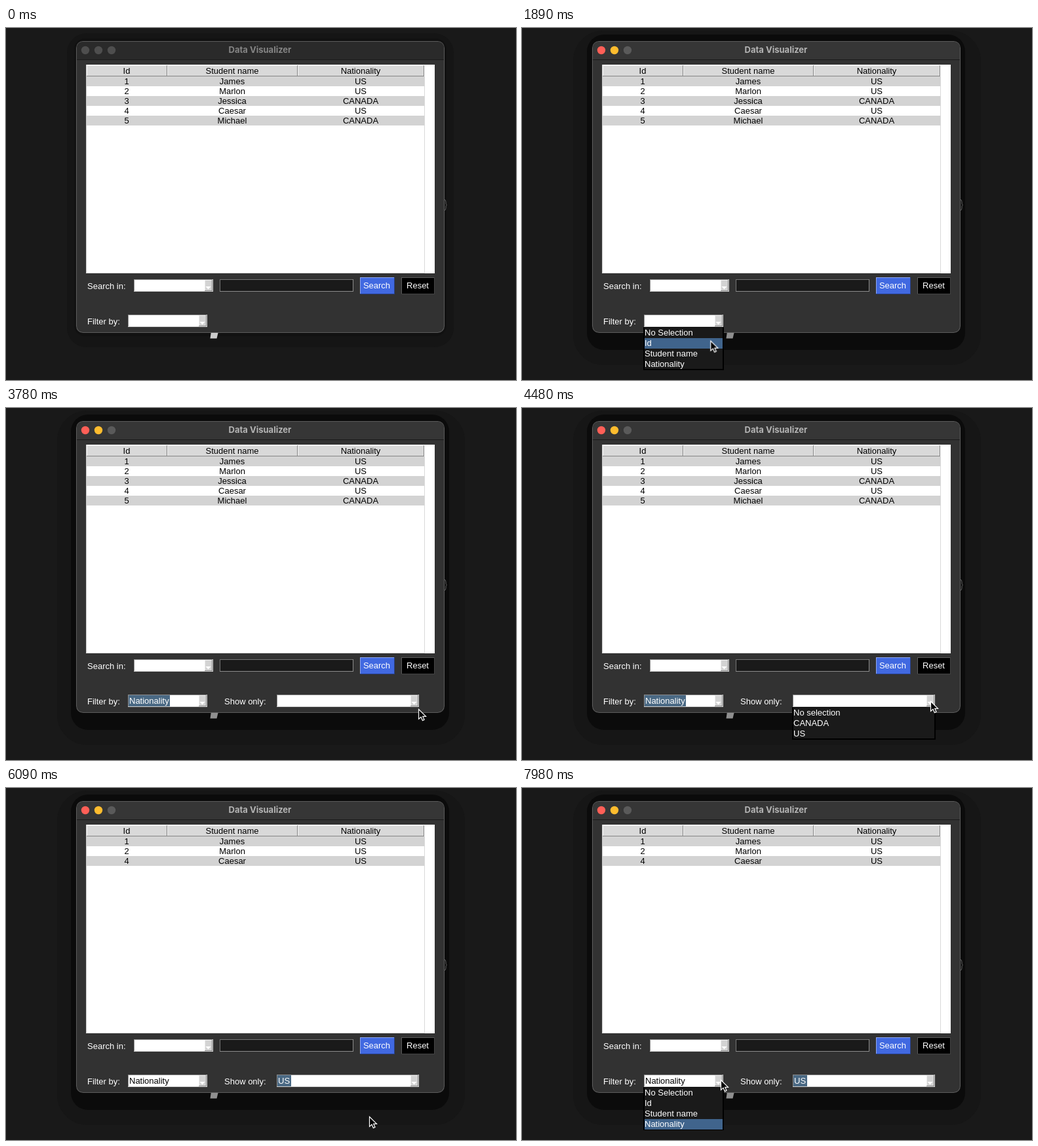
These frames come from a looping animation (778x538 px, 8000 ms). An HTML page:

```html
<!DOCTYPE html>
<html lang="en">
<head>
<meta charset="utf-8">
<title>Table filter demo</title>
<style>
html, body { margin: 0; width: 100%; height: 100%; overflow: hidden; background: #191919; }
svg { display: block; width: 778px; height: 538px; font: 13px "Liberation Sans", Arial, sans-serif; }
rect { shape-rendering: crispEdges; }
.round { shape-rendering: auto; }
.mid { text-anchor: middle; }
.title { font: 700 13px Inter, sans-serif; text-anchor: middle; }

.step { animation: 8s step-end infinite; }
.idle { animation-name: idle; }
.active { animation-name: active; }
.all-rows { animation-name: all-rows; }
.us-rows { animation-name: us-rows; }
.field-list { animation-name: field-list; }
.value-list { animation-name: value-list; }
.field-hover { animation-name: field-hover; }
.value-hover { animation-name: value-hover; }
.field-marked { animation-name: field-marked; }
.field-plain { animation-name: field-plain; }
.show-only { animation-name: show-only; }
.value-marked { animation-name: value-marked; }
.ring { animation-name: ring; }
.pointer { animation: pointer 8s linear infinite; }

@keyframes idle { 0% { opacity: 1 } 17.4%, 100% { opacity: 0 } }
@keyframes active { 0% { opacity: 0 } 17.4%, 100% { opacity: 1 } }
@keyframes all-rows { 0% { opacity: 1 } 69%, 100% { opacity: 0 } }
@keyframes us-rows { 0% { opacity: 0 } 69%, 100% { opacity: 1 } }
@keyframes field-list { 0%, 37.5% { opacity: 0 } 19.15%, 99.65%, 100% { opacity: 1 } }
@keyframes value-list { 0%, 68.15%, 100% { opacity: 0 } 55.9% { opacity: 1 } }
@keyframes field-marked { 0%, 68.15%, 100% { opacity: 0 } 37.5% { opacity: 1 } }
@keyframes field-plain { 0% { opacity: 0 } 68.15%, 100% { opacity: 1 } }
@keyframes show-only { 0% { opacity: 0 } 38.4%, 100% { opacity: 1 } }
@keyframes value-marked { 0% { opacity: 0 } 68.15%, 100% { opacity: 1 } }
@keyframes field-hover {
  0% { opacity: 0; transform: none }
  21.7% { opacity: 1; transform: none }
  23.4% { opacity: 1; transform: translateY(16px) }
  24.5% { opacity: 1; transform: translateY(32px) }
  26%, 100% { opacity: 1; transform: translateY(48px) }
}
@keyframes value-hover {
  0% { opacity: 0; transform: none }
  59.7% { opacity: 1; transform: none }
  61.2% { opacity: 1; transform: translateY(16px) }
  62.5%, 100% { opacity: 1; transform: translateY(32px) }
}
@keyframes ring {
  0%, 19.15%, 37.5%, 55.9%, 68.15%, 99.65%, 100% { opacity: 0 }
  17.4%, 35.8%, 54.15%, 66.4%, 97.9% { opacity: 1 }
}
@keyframes pointer {
  0%, 3.5% { transform: translate(368px, 545px); animation-timing-function: ease-in-out }
  14.875%, 20.1% { transform: translate(300px, 451px); animation-timing-function: ease-in-out }
  28%, 42% { transform: translate(269px, 516px); animation-timing-function: ease-in-out }
  47.25% { transform: translate(629px, 460px) }
  49% { transform: translate(632px, 455px); animation-timing-function: ease-in-out }
  52.5%, 57.75% { transform: translate(623px, 448px); animation-timing-function: ease-in-out }
  63% { transform: translate(557px, 497px); animation-timing-function: ease-out }
  64.75%, 77.9% { transform: translate(554px, 502px); animation-timing-function: cubic-bezier(.4, .15, .8, .85) }
  89.25% { transform: translate(330px, 452px); animation-timing-function: ease-out }
  96.25%, 100% { transform: translate(303px, 446px) }
}
</style>
</head>
<body>
<svg id="stage" viewBox="0 0 778 538"></svg>
<script>
const rect = (x, y, w, h, fill, extra = '') =>
  `<rect x="${x}" y="${y}" width="${w}" height="${h}" fill="${fill}" ${extra}/>`;
const text = (x, y, str, fill = '#000', cls = '') =>
  `<text x="${x}" y="${y}" fill="${fill}" class="${cls}">${str}</text>`;
const step = (cls, body) => `<g class="step ${cls}">${body}</g>`;
const round = (x, y, w, h, r, fill) => rect(x, y, w, h, fill, `rx="${r}" class="round"`);
const light = (x, fill) => `<circle cx="${x}" cy="34" r="6.2" fill="${fill}"/>`;

// Box with light top/left and dark bottom/right edges
const bevel = (x, y, w, h, fill, hi, lo) =>
  rect(x, y, w, h, lo) + rect(x, y, w - 1, h - 1, hi) + rect(x + 1, y + 1, w - 2, h - 2, fill);

const combo = (x, y, w) =>
  bevel(x, y, w, 19, '#fff', '#8c8c8c', '#d0d0d0') +
  bevel(x + w - 13, y + 1, 12, 17, '#d3d3d3', '#eee', '#8c8c8c') +
  `<path d="M${x + w - 11.5} ${y + 11}h8l-4 4.5z" fill="#fff"/>`;

const columns = [[123, 123, 184, 'Id'], [246, 199, 345, 'Student name'], [445, 193, 541, 'Nationality']];
const students = [
  ['1', 'James', 'US'], ['2', 'Marlon', 'US'], ['3', 'Jessica', 'CANADA'],
  ['4', 'Caesar', 'US'], ['5', 'Michael', 'CANADA']
];

const header = columns.map(([x, w, mid, name]) =>
  bevel(x, 57, w, 17, '#d9d9d9', '#f4f4f4', '#858585') + text(mid, 70, name, '#000', 'mid')).join('');

const rows = list => list.map((cells, i) =>
  rect(123, 74 + 15 * i, 515, 15, i % 2 ? '#fff' : '#d3d3d3') +
  cells.map((c, k) => text(columns[k][2], 86 + 15 * i, c, '#000', 'mid')).join('')).join('');

const dropdown = (x, w, items, hover) =>
  rect(x - 1, 457, w + 2, items.length * 16 + 2, '#000') +
  rect(x + 1, 458, w - 2, items.length * 16 - 1, '#1a1a1a') +
  step(hover, rect(x + 1, 458, w - 2, 16, '#40648c')) +
  items.map((s, i) => text(x + 1, 470 + 16 * i, s, '#fff')).join('');

const marked = (x, w, str) => rect(x + 1, 439, w, 17, '#4a6984') + text(x + 2, 452, str, '#fff');

const backdrop =
  rect(0, 0, 778, 538, '#191919') +
  step('idle', round(93, 8, 590, 480, 30, '#151515') + round(104, 16, 568, 455, 16, '#111')) +
  step('active', round(78, 4, 622, 511, 46, '#161616') + round(99, 10, 577, 482, 26, '#0b0b0b')) +
  '<path d="M668 262q3 0 3 4v2q0 2 1.5 2.5q-1.5 .5-1.5 2.5v2q0 4-3 4" fill="none" stroke="#666"/>' +
  '<g fill="#ccc">' + step('idle', '<path d="M313 464h11l-2.5 10.500h-10z"/>') + '</g>' +
  '<g fill="#8f8f8f">' + step('active', '<path d="M313 464h11l-2.500 10.500h-10z"/>') + '</g>';

const bar = (fill, ink, lights) =>
  `<path d="M108 48V31q0-10 10-10H658q10 0 10 10V48z" fill="${fill}"/>` +
  lights.map((c, i) => light(121 + 20 * i, c)).join('') +
  text(387.5, 38, 'Data Visualizer', ink, 'title');

const frame =
  round(107, 20, 562, 446, 10.5, '#5c5c5c') +
  round(108, 21, 560, 444, 9.5, '#323232') +
  step('idle', bar('#2a2a2a', '#858585', Array(3).fill('#4e4e4e'))) +
  step('active', bar('#363636', '#b4b4b4', ['#ff5f57', '#febc2e', '#5a5a5a'])) +
  rect(108, 48, 560, 1, '#1a1a1a');

const table =
  rect(122, 56, 532, 319, '#fff') + header +
  step('all-rows', rows(students)) +
  step('us-rows', rows(students.filter(s => s[2] === 'US'))) +
  rect(638, 74, 1, 301, '#d9d9d9') + rect(122, 56, 1, 319, '#c8c8c8') + rect(122, 374, 517, 1, '#d9d9d9');

const controls =
  text(124, 399, 'Search in:', '#fff') + combo(195, 384, 121) +
  bevel(326, 384, 204, 19, '#1a1a1a', '#757575', '#8c8c8c') +
  bevel(540, 381, 53, 26, '#4169e1', '#8ea6f0', '#27408b') + text(565.5, 398, 'Search', '#fff', 'mid') +
  bevel(603, 381, 51, 26, '#000', '#5a5a5a', '#444') + text(628, 398, 'Reset', '#fff', 'mid') +
  text(124, 453, 'Filter by:', '#fff') + combo(186, 438, 121) +
  step('field-marked', marked(186, 63, 'Nationality')) +
  step('field-plain', text(188, 452, 'Nationality')) +
  step('show-only', text(333, 453, 'Show only:', '#fff') + combo(413, 438, 217)) +
  step('value-marked', marked(413, 21, 'US'));

const lists =
  step('field-list', dropdown(186, 121, ['No Selection', 'Id', 'Student name', 'Nationality'], 'field-hover')) +
  step('value-list', dropdown(413, 217, ['No selection', 'CANADA', 'US'], 'value-hover'));

const pointer = `<g class="pointer">` +
  step('ring', '<g fill="none"><circle r="21.500" stroke="#000" stroke-width="3.2"/>' +
    '<circle r="21.500" stroke="#e8e8e8" stroke-width="1.4"/></g>') +
  '<path d="M.5 .5V15.500L4 12.300L6.400 17.600L9 16.500L6.700 11.300H11.500Z" fill="#000" stroke="#fff" stroke-width="1.200"/></g>';

document.getElementById('stage').innerHTML = backdrop + frame + table + controls + lists + pointer;
</script>
</body>
</html>
```
